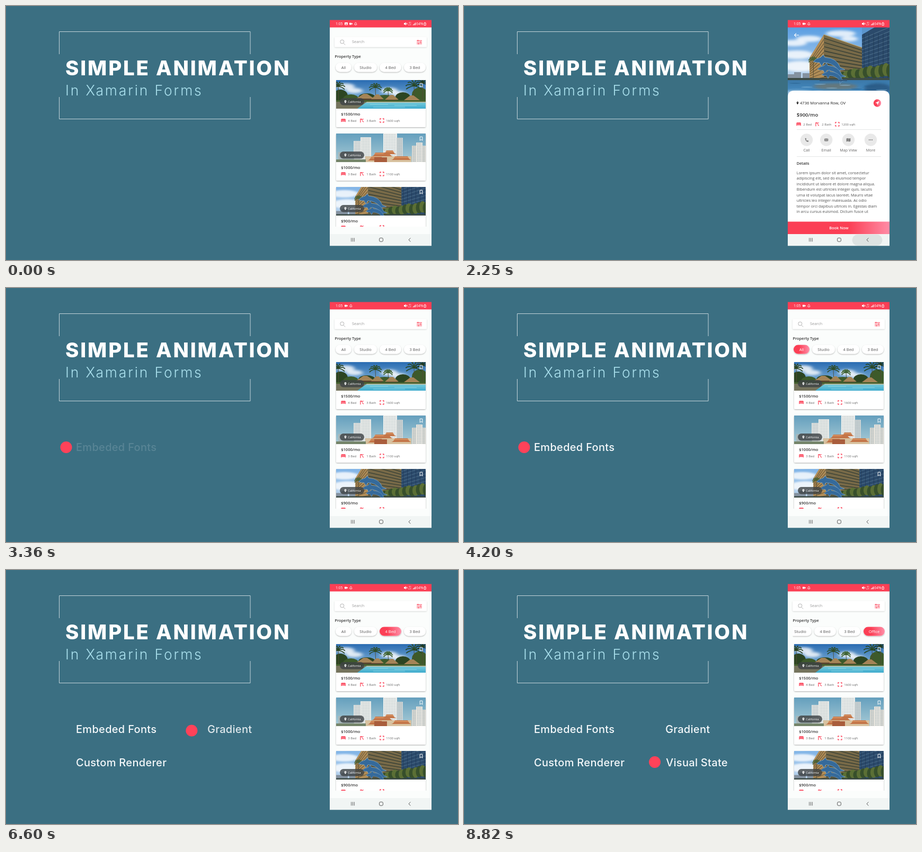
Write an HTML page that moves like this. It is 853 by 480 pixels and loops after 8850 ms.

```html
<!DOCTYPE html>
<html lang="en">
<head>
<meta charset="utf-8">
<title>Simple Animation</title>
<style>
html, body { margin: 0; width: 100%; height: 100%; overflow: hidden; background: #3b6f82; }
svg { display: block; width: 853px; height: 480px; }
.head { font-family: Inter, sans-serif; }
.phone { font-family: "Open Sans", sans-serif; }
</style>
</head>
<body>
<svg id="stage" viewBox="0 0 853 480"></svg>
<script>
const RED = '#fb3f55', LOOP = 8850;
const attrs = o => Object.entries(o).map(([k, v]) => ` ${k}="${v}"`).join('');
const text = (x, y, s, size, fill, more = {}) =>
  `<text${attrs({ x, y, 'font-size': size, fill, ...more })}>${s}</text>`;
const rect = (x, y, width, height, fill, more = {}) =>
  `<rect${attrs({ x, y, width, height, fill, ...more })}/>`;
const circle = (cx, cy, r, fill) => `<circle${attrs({ cx, cy, r, fill })}/>`;
const oval = (cx, cy, rx, ry, fill) => `<ellipse${attrs({ cx, cy, rx, ry, fill })}/>`;
const shape = (d, fill, more = {}) => `<path${attrs({ d, fill, ...more })}/>`;
const line = (d, stroke, w = 1, more = {}) =>
  shape(d, 'none', { stroke, 'stroke-width': w, ...more });
const group = (x, y, body, more = {}) =>
  `<g${attrs({ transform: `translate(${x} ${y})`, ...more })}>${body}</g>`;
const MID = { 'text-anchor': 'middle' }, SEMI = { 'font-weight': 600 };

const gradient = (id, a, b, down, from = 0) =>
  `<linearGradient id="${id}" x2="${down ? 0 : 1}" y2="${down ? 1 : 0}">
  <stop offset="${from}" stop-color="${a}"/><stop offset="1" stop-color="${b}"/></linearGradient>`;
const clip = (id, ...box) => `<clipPath id="${id}">${rect(...box, '#000')}</clipPath>`;

const pin = (x, y, fill, k = 1) =>
  `<path transform="translate(${x} ${y}) scale(${k})" fill="${fill}" fill-rule="evenodd"
  d="M0,3.4C-3.4,-.6 -2.4,-3.4 0,-3.4S3.4,-.6 0,3.4ZM-.9,-1a.9,.9 0 1 0 1.8,0a.9,.9 0 1 0 -1.8,0Z"/>`;

const clouds = (list, fill = '#ffffffcc') =>
  `<g filter="url(#haze)">${list.map(c => oval(...c, fill)).join('')}</g>`;

const palm = (x, y, h, k, fill) => {
  let s = line(`M${x},${y}q1,${h / 2} 0,${h}`, '#4f4a32', .9);
  for (let i = 0; i < 8; i++) {
    const a = -.4 + i * .56, dx = Math.cos(a) * k, dy = Math.sin(a) * k * .7;
    s += line(`M${x},${y}q${dx * .6},${-dy - 3} ${dx},${-dy + 2}`, fill, 1.7);
  }
  return s;
};

const resort = () => {
  let s = rect(0, 0, 169, 54, 'url(#sky1)')
    + clouds([[18, 12, 17, 6], [34, 20, 16, 5], [100, 20, 16, 6], [118, 26, 14, 5]]);
  [[8, 30, 14, 12], [28, 36, 15, 9], [58, 33, 16, 8], [92, 35, 20, 7], [126, 32, 14, 9], [158, 28, 15, 14]]
    .forEach((c, i) => s += oval(...c, i % 2 ? '#3d5a2a' : '#2c4522'));
  s += palm(74, 14, 26, 12, '#2f4d28') + palm(98, 20, 18, 9, '#3d6130')
    + palm(147, 11, 28, 16, '#294824') + palm(163, 6, 32, 13, '#203a20') + palm(4, 12, 26, 13, '#2c4522');
  [[38, 26, 34], [66, 27, 24], [92, 28, 26], [128, 29, 30]].forEach(([x, y, w]) =>
    s += rect(x + 3, y + 7, w - 6, 7, '#57452f') + shape(`M${x},${y + 9}l${w * .4},-9h${w * .2}l${w * .4},9z`, '#a58457'));
  return s + rect(0, 38, 169, 5, '#45612f') + rect(48, 41, 121, 1.6, '#d9cdb4')
    + rect(0, 42.5, 169, 12, 'url(#pool)') + shape('M0,41H58L40,54H0Z', '#75745d')
    + line('M64,46h34m12,2h42M70,51h60', '#a9e5ee', .6);
};

const windows = (x, y, w, h, fill) => {
  let s = '';
  for (let i = 2; i < h; i += 3)
    s += line(`M${x + 2},${y + i}h${w - 4}`, fill, 1.1, { 'stroke-dasharray': '1.6 1.4' });
  return s;
};

const city = () => {
  let s = rect(0, 0, 169, 54, 'url(#sky2)');
  [[33, 14, 15, '#dfe2e0'], [46, 7, 20, '#edeeea'], [89, 0, 26, '#f0f1ee'], [114, 8, 12, '#cbd2d3'],
    [143, 23, 26, '#d9d8d2'], [151, 17, 12, '#e6e4de'], [4, 35, 30, '#aab8b9']]
    .forEach(([x, y, w, c]) => s += rect(x, y, w, 54 - y, c) + windows(x, y, w, 54 - y, '#8ea3ad'));
  s += rect(55, 43, 87, 11, '#d8c2a0');
  [[59, 45, 34], [67, 37, 40], [88, 33, 26], [104, 44, 38]].forEach(([x, y, w]) =>
    s += shape(`M${x},${y + 6}q5,-1 7,-7h${w - 14}q2,6 7,7z`, '#c47548')
      + line(`M${x + 5},${y + 1}h${w - 10}`, '#e6ab78', 1));
  return s + rect(72, 45, 24, 9, '#a95d3c') + rect(0, 49, 56, 5, '#75856a');
};

const plaza = () => {
  let s = rect(0, 0, 192, 136, 'url(#sky3)')
    + clouds([[12, 30, 24, 6], [40, 22, 24, 6], [18, 52, 30, 8], [24, 74, 34, 10], [100, 12, 28, 6], [116, 22, 16, 5]]);
  [[0, 89, 14], [12, 85, 13], [28, 87, 16]].forEach(([x, y, w]) => s += rect(x, y, w, 14, '#8492a0'));
  s += shape('M41,99V58L68,14V99Z', '#b18d57') + shape('M68,14L141,39V99H68Z', '#786a48');
  for (let i = 0; i < 10; i++) {
    s += line(`M42,${64 + i * 4}L68,${23 + i * 8}`, '#6d5a39', 1.3)
      + line(`M69,${21 + i * 8}L141,${44 + i * 5.8}`, '#3f4538', 1.8);
  }
  s += line('M68,14L141,39', '#c3a56c', 1.2);
  s += shape('M140,14L164,0H192V99H140Z', '#2b4a6b') + shape('M140,0H164L140,14Z', '#5a94cc');
  for (let i = 0; i < 11; i++) s += line(`M140,${22 + i * 7}L192,${i * 8}`, '#5d7f99', .8);
  for (let i = 0; i < 6; i++) s += line(`M${144 + i * 9},12V99`, '#1c3450', .7);
  for (let i = 0; i < 13; i++)
    s += oval(104 + i * 7.4, 92 - (i * 5 % 4) - i * .8, 7, 8 + i * .4, i % 2 ? '#5b6f35' : '#374f2b');
  s += palm(48, 62, 36, 9, '#4a6136') + rect(0, 96, 192, 5, '#3d4c47')
    + rect(0, 100, 192, 36, 'url(#lake)') + clouds([[18, 124, 28, 5]], '#d8e8f299')
    + clouds([[90, 112, 42, 6]], '#86714c88') + clouds([[170, 116, 26, 10]], '#1f466a99');
  for (let i = 0; i < 16; i++)
    s += oval(14 + i * 47 % 166, 106 + i * 1.8, 11, .8, i % 3 ? '#8fc0e099' : '#245b8899');
  // leaping dolphins
  [[48, 62, 1], [56, 77, .9], [64, 88, .75]].forEach(([x, y, k]) =>
    s += `<path transform="translate(${x} ${y}) scale(${k})" fill="#356a9b" stroke="#9dc3df" stroke-width=".6"
    d="M0,3q5,-6 14,-8l5,-5l3,5q22,1 29,19l9,4l-9,1l-5,7l0,-9q-11,-12 -26,-12l-4,7l-4,-7q-7,0 -12,-2z"/>`);
  return s + rect(60, 99, 52, 3, '#345c80');
};

const info = (x, y, beds, baths, area) => {
  const label = (dx, s) => text(x + dx, y + 2.3, s, 6, '#666');
  return group(x, y - 3, shape('M0,6V1.5Q0,0 1.2,0H7.4Q8.6,0 8.6,1.5V6H7.6V5H1V6Z', RED)
      + line('M.6,2.8h7.4', '#fff', .7))
    + group(x + 36, y - 4, line('M.6,8V1.3H3.6M2.4,3L6.4,1.2M4,4l2.4,3', RED, 1.2))
    + group(x + 73, y - 4, line('M.6,2.8V.6H2.8M5.4,.6H7.6V2.8M7.6,5.4V7.6H5.4M2.8,7.6H.6V5.4', RED, 1.3))
    + label(13, beds + ' Bed') + label(48, baths + ' Bath') + label(85, area + ' sqft');
};

const card = (y, photo, price, ...facts) => group(623, y,
  rect(0, 0, 169, 89, '#fff', { rx: 2, filter: 'url(#soft)' })
  + `<g clip-path="url(#cover)">${photo}</g>`
  + rect(7, 34, 46, 13.5, '#3c4144', { rx: 6.7, opacity: .8 }) + pin(17.5, 40.8, '#fff', .85)
  + text(22.3, 42.9, 'California', 5.4, '#fff')
  + line('M158.2,6.2h4.6v7l-2.3,-2l-2.3,2z', '#fff', 1)
  + text(9.3, 67.3, price + '/mo', 7.5, '#333', SEMI) + info(9.3, 76.3, ...facts));

const chips = [['All', 622, 30], ['Studio', 657, 43], ['4 Bed', 705, 41], ['3 Bed', 751, 41], ['Office', 798, 40]];
const chip = ([s, x, w], i) => rect(x, 107.5, w, 17, '#fff', { rx: 8.5, filter: 'url(#soft)' })
  + text(x + w / 2, 118.7, s, 7.5, '#555', MID)
  + `<g id="on${i}">${rect(x, 107.5, w, 17, 'url(#pink)', { rx: 8.5 }) + text(x + w / 2, 118.7, s, 7.5, '#fff', MID)}</g>`;

const listPage = () => rect(611, 40, 193, 391, '#fbfdfc')
  + rect(620, 58.5, 174, 19, '#fff', { rx: 1.5, filter: 'url(#faint)' })
  + line('M637,70.5l3,3M637.8,67.5a3.5,3.5 0 1 0 -7,0a3.5,3.5 0 1 0 7,0', '#aaa', .9)
  + text(653, 70.4, 'Search', 7.4, '#999')
  + line('M775,65.3h10M775,68.3h10M775,71.3h10', RED, 1)
  + line('M777.5,64v2.6M782.5,67v2.6M778.5,70v2.6', RED, 1.2)
  + text(620.6, 98.3, 'Property Type', 7.3, '#333', SEMI)
  + `<g clip-path="url(#chipBox)"><g id="chips">${chips.map(chip).join('')}</g></g>`
  + `<g clip-path="url(#listBox)">${card(140, resort(), '$1500', 4, 3, 1600)
    + card(241, city(), '$1000', 3, 1, 1100)
    + card(342, `<g transform="translate(0 -33) scale(.88)">${plaza()}</g>`, '$900', 2, 2, 1200)}</g>`;

const lorem = ['Lorem ipsum dolor sit amet, consectetur', 'adipiscing elit, sed do eiusmod tempor',
  'incididunt ut labore et dolore magna aliqua.', 'Bibendum est ultricies integer quis. Iaculis',
  'urna id volutpat lacus laoreet. Mauris vitae', 'ultricies leo integer malesuada. Ac odio',
  'tempor orci dapibus ultrices in. Egestas diam', 'in arcu cursus euismod. Dictum fusce ut'];

const actions = [
  ['Call', 646.5, shape('M-3,-3l1.6,-.6l1.2,2.2l-1,1q.8,1.6 2,2.2l1,-1l2.1,1.3l-.6,1.5q-5,1 -6.3,-6.6z', '#777')],
  ['Email', 683.7, rect(-3.6, -2.6, 7.2, 5.2, '#777', { rx: .8 }) + line('M-3,-1.8L0,.6L3,-1.8M-3,2l2,-1.8M3,2L1,.2', '#eee', .6)],
  ['Map View', 725.5, shape('M-3.8,-2.4l2.3,-.9v5.8l-2.3,.9zM-1.2,-3.3l2.4,.9v5.8l-2.4,-.9zM1.5,-2.4l2.3,-.9v5.8l-2.3,.9z', '#777')],
  ['More', 767.5, circle(-2.8, 0, .9, '#777') + circle(0, 0, .9, '#777') + circle(2.8, 0, .9, '#777')]];

const sheet = () => shape('M611,410V172q0,-12 12,-12H791q12,0 12,12V410Z', '#fff') + rect(611, 409, 193, 40, '#fff')
  + pin(629.5, 183.4, '#111', .8) + text(634, 186.2, '4736 Morvanna Row, OV', 7.6, '#222')
  + circle(780, 183.5, 7.2, 'url(#pink)') + shape('M783.6,179.8l-7.4,3.2l3.4,.9l.9,3.4z', '#fff')
  + text(627.7, 208.6, '$900/mo', 9.6, '#333', SEMI) + info(627.3, 223.3, 2, 2, 1200)
  + line('M628,233.5H787M628,284.5H787', '#e3e5e5', .9)
  + actions.map(([s, x, icon]) => circle(x, 253, 11.7, '#e9e9e9') + group(x, 253, icon)
    + text(x, 275.2, s, 7.2, '#666', MID)).join('')
  + text(627.7, 300, 'Details', 7.2, '#333', SEMI)
  + lorem.map((s, i) => text(627.7, 317.8 + i * 10.5, s, 7.25, '#505050')).join('');

const detailPage = () => rect(611, 40, 193, 391, '#fff') + group(611, 40, plaza())
  + line('M632,55H623.6M627,51.6L623.6,55L627,58.4', '#fff', 1.1)
  + `<g clip-path="url(#sheetBox)"><g id="sheet">${sheet()}</g></g>`
  + rect(611, 407.5, 192, 24, 'url(#book)') + text(707.3, 422.2, 'Book Now', 7.4, '#fff', { ...MID, ...SEMI });

const statusBar = () => rect(611, 26, 193, 14.5, RED) + text(622, 36, '1:05', 6.8, '#fff')
  + `<g id="picIcon">${rect(639, 31, 6, 5, '#fff', { rx: .8 }) + shape('M640,35l1.3,-2l1,1l.8,-.7l1.2,1.7z', RED)}</g>`
  + `<g id="icons">${rect(648, 31.7, 4, 3.8, '#fff', { rx: .6 }) + shape('M652,33.5l2,-1.5v3.2z', '#fff')
    + line('M657.4,35.2q1,-1 1,-2.4q0,-1.6 1.4,-1.6t1.4,1.6q0,1.4 1,2.4zM659.2,36.3h1.2', '#fff', .7)}</g>`
  + shape('M751,32.2h1.6l2,-1.6v6l-2,-1.6h-1.6z', '#fff') + line('M755.4,32l2,3m0,-3l-2,3', '#fff', .8)
  + text(762.3, 33.4, '4G', 3.6, '#fff', MID) + line('M760.5,34.5v2m-1,-1l1,1l1,-1M763.5,36.5v-2m-1,1l1,-1l1,1', '#fff', .5)
  + line('M768,36.3v-1M769.5,36.3v-2.2M771,36.3v-3.6M772.5,36.3v-5', '#fff', .9)
  + text(774, 36, '64%', 6.8, '#fff')
  + line('M789,32h3.2v4.4h-3.2zM790,31h1.2', '#fff', .9);

const navBar = () => rect(611, 431, 193, 22.5, '#f1f5f4')
  + rect(732.5, 431.8, 57, 21, '#dde3e2', { rx: 10.5, id: 'ripple' })
  + line('M651.7,438.3v7M654.5,438.3v7M657.3,438.3v7', '#555', .9)
  + rect(704.6, 438.4, 6.8, 6.8, 'none', { rx: 2, stroke: '#555', 'stroke-width': 1 })
  + line('M763.4,438.4L760,441.9L763.4,445.4', '#555', 1);

const labels = [['Embeded Fonts', 132, 308], ['Custom Renderer', 132, 370.5], ['Gradient', 380, 308], ['Visual State', 381, 370.5]];

const shadow = (id, opacity) => `<filter id="${id}" x="-20%" y="-20%" width="140%" height="160%">
  <feDropShadow dx="0" dy="1" stdDeviation="1.1" flood-opacity="${opacity}"/></filter>`;

const stage = document.getElementById('stage');
stage.innerHTML = `<defs>
  ${gradient('sky1', '#2a6cb2', '#a0cbe4', true)}${gradient('sky2', '#649fbd', '#a9cbd6', true)}
  ${gradient('sky3', '#5a9ee2', '#e3ecf2', true)}${gradient('pool', '#76cbdc', '#3ba9cc', true)}
  ${gradient('lake', '#3b78a8', '#4a96d0', true)}${gradient('pink', RED, '#ff8fa9', false, .35)}
  ${gradient('book', RED, '#ff8ca6', false, .6)}
  ${shadow('soft', .32)}${shadow('faint', .18)}
  <filter id="haze" x="-30%" y="-60%" width="160%" height="220%"><feGaussianBlur stdDeviation="3.5 2"/></filter>
  ${clip('screen', 611, 26.5, 192, 427)}${clip('cover', 0, 0, 169, 54)}${clip('chipBox', 620.5, 101, 174, 30)}
  ${clip('listBox', 612, 132, 191, 285)}${clip('sheetBox', 611, 40, 193, 368)}</defs>
  ${rect(0, 0, 853, 480, '#3b6f82')}
  <g class="head">
  ${line('M100.5,91V48.5H461V91M100.5,172V213.5H461V172', '#c3d4da', 1)}
  ${text(112, 130.5, 'SIMPLE ANIMATION', 38.5, '#fff', { 'font-weight': 800, 'letter-spacing': 2.8 })}
  ${text(112, 168.6, 'In Xamarin Forms', 26.5, '#a9dfec', { 'font-weight': 300, 'letter-spacing': 2.85 })}
  ${labels.map(([s, x, y], i) => text(x, y, s, 20, '#f4f8fa', { id: 'label' + i, 'font-weight': 500, 'letter-spacing': .3 })).join('')}
  <circle id="dot" r="11" fill="#ff4259"/></g>
  <g class="phone" clip-path="url(#screen)">${listPage()}<g id="detail">${detailPage()}</g>${statusBar()}${navBar()}</g>`;

const el = id => document.getElementById(id);
const seg = (t, a, b) => Math.min(1, Math.max(0, (t - a) / (b - a)));
const ease = u => u * u * (3 - 2 * u);
const out = u => 1 - (1 - u) ** 3;
const move = (id, x, y, k = 1) => el(id).setAttribute('transform', `translate(${x} ${y}) scale(${k})`);
const fade = (id, o) => el(id).setAttribute('opacity', o);

const taps = [4150, 5000, 5950, 6850, 8300, LOOP];
const hops = [5060, 6090, 7200];
const stops = [[113.5, 301], [113.5, 363], [360, 301], [360, 363]];

function draw(t) {
  // pages
  const back = seg(t, 2430, 2680);
  fade('detail', ease(seg(t, 300, 480)) * (1 - ease(back)));
  move('detail', 0, 30 * back * back);
  move('sheet', 0, 330 * (1 - out(seg(t, 480, 1040))));
  fade('ripple', seg(t, 2080, 2180) * (1 - seg(t, 2420, 2740)));
  const gone = t >= 1800;
  fade('picIcon', gone ? 0 : 1);
  move('icons', gone ? -9 : 0, 0);

  // filter chips
  chips.forEach((_, i) => fade('on' + i, t >= taps[i] && t < taps[i + 1] ? 1 : 0));
  move('chips', -44 * out(seg(t, 7500, 8000)), 0);

  // feature list
  let [x, y] = stops[0];
  hops.forEach((start, i) => {
    const u = ease(seg(t, start, start + 580));
    x += (stops[i + 1][0] - stops[i][0]) * u;
    y += (stops[i + 1][1] - stops[i][1]) * u;
  });
  move('dot', x, y, 1.28 * ease(seg(t, 2450, 2700)) - .28 * ease(seg(t, 2700, 2900)));
  [3270, ...hops].forEach((start, i) => fade('label' + i, seg(t, start, start + 580)));
}

function tick() {
  draw(performance.now() % LOOP);
  requestAnimationFrame(tick);
}
tick();
</script>
</body>
</html>
```
